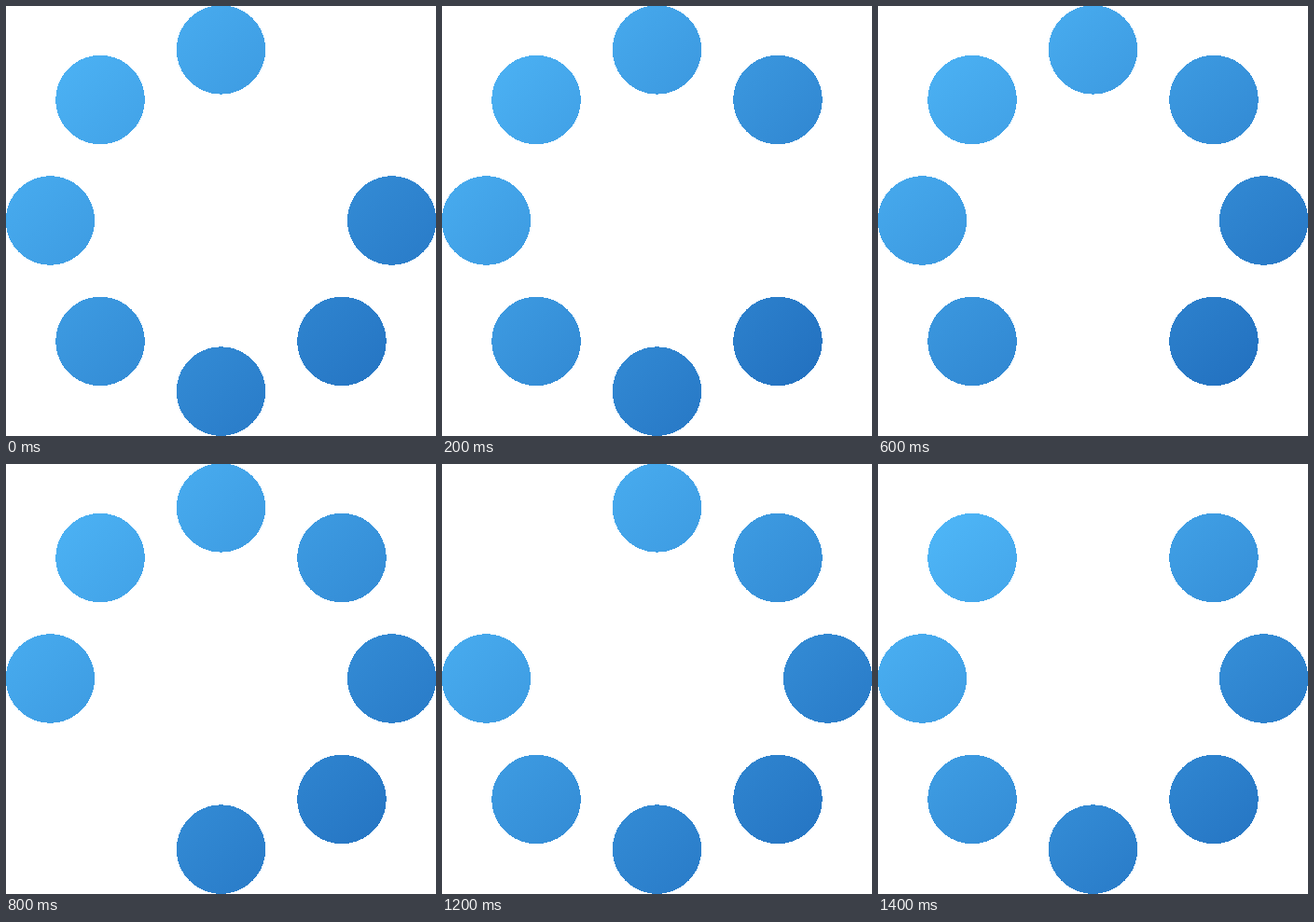
Write an HTML page that moves like this. It is 461 by 461 pixels and loops after 1600 ms.

```html
<!DOCTYPE html>
<html lang="en">
<head>
<meta charset="utf-8">
<title>Loading spinner</title>
<style>
  html, body { margin: 0; width: 100%; height: 100%; overflow: hidden; background: #fff; }
  svg { display: block; width: 100%; height: 100%; }
</style>
</head>
<body>
<svg viewBox="0 0 461 461" shape-rendering="crispEdges">
  <defs>
    <!-- spans the box of the visible dots, so the tint shifts slightly with the gap -->
    <linearGradient id="blue" x1="0" y1="0" x2="1" y2="1">
      <stop offset="0" stop-color="#52bcfc"/>
      <stop offset="1" stop-color="#1f6bbb"/>
    </linearGradient>
  </defs>
  <path id="dots" fill="url(#blue)"/>
</svg>
<script>
  const COUNT = 8, STEP = 200;
  const CENTER = { x: 230.5, y: 230 }, RING = 183.1, R = 47.7;
  const FIRST_GAP = 1; // the gap starts at the upper right

  function dot(i) {
    const a = (i / COUNT) * 2 * Math.PI;
    const x = CENTER.x + RING * Math.sin(a);
    const y = CENTER.y - RING * Math.cos(a);
    return `M${x - R} ${y}a${R} ${R} 0 1 1 ${2 * R} 0a${R} ${R} 0 1 1 ${-2 * R} 0z`;
  }

  const all = Array.from({ length: COUNT }, (_, i) => dot(i));
  const poses = all.map((_, gap) => all.filter((_, i) => i !== gap).join(""));
  const path = document.getElementById("dots");
  const start = performance.now();
  let shown = -1;

  function draw(now) {
    const step = Math.floor(Math.max(0, now - start) / STEP);
    const gap = (step + FIRST_GAP) % COUNT;
    if (gap !== shown) {
      path.setAttribute("d", poses[gap]);
      shown = gap;
    }
    requestAnimationFrame(draw);
  }
  draw(start);
</script>
</body>
</html>
```
